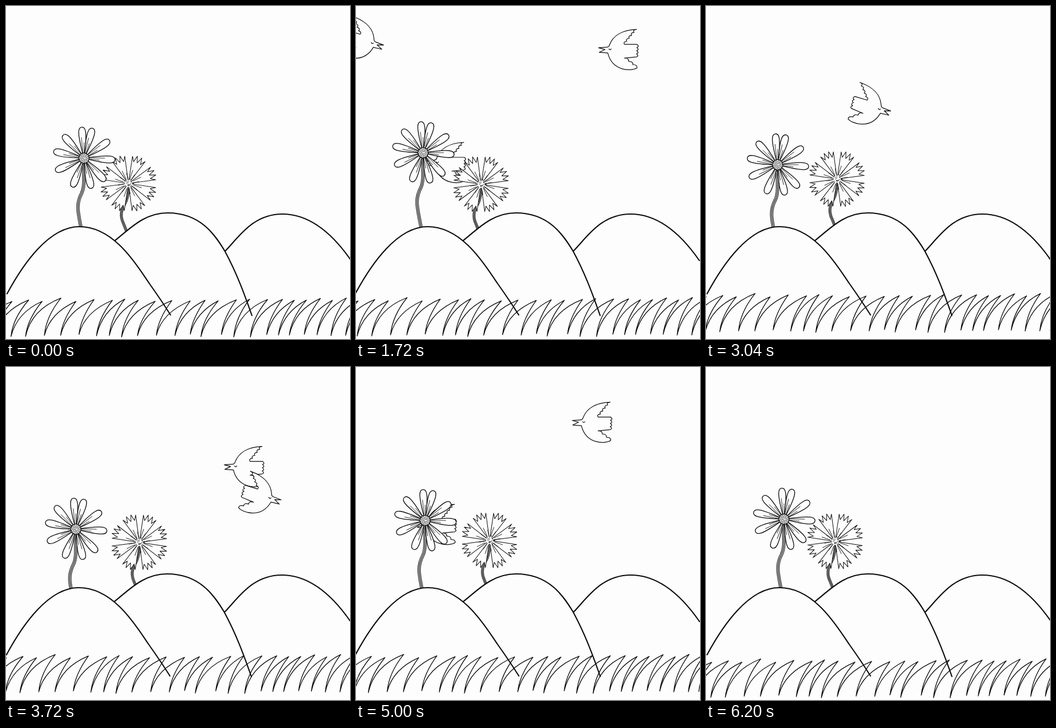
An HTML page with a canvas that plays this animation: 600x581 px, repeating every 6240 ms.

```html
<!DOCTYPE html>
<html lang="en">
<head>
<meta charset="utf-8">
<title>Flowers and birds</title>
<style>
html, body { margin: 0; width: 100%; height: 100%; overflow: hidden; background: #fefdfe; }
canvas { display: block; }
</style>
</head>
<body>
<canvas id="stage" width="600" height="581"></canvas>
<script>
const g = document.getElementById('stage').getContext('2d');
const INK = '#0c0c0c', PAPER = '#fefdfe', LOOP = 6240, STEP = 40;
const { sin, cos, PI } = Math, RAD = PI / 180;

function seeded(seed) {
  return () => (seed = seed * 16807 % 2147483647) / 2147483647;
}

// Sway: mean plus two harmonics of the loop
function sway(t, mean, c1, s1, c2, s2) {
  const a = 2 * PI * t / LOOP;
  return mean + c1 * cos(a) + s1 * sin(a) + c2 * cos(2 * a) + s2 * sin(2 * a);
}
const daisyAt = t => [sway(t, 124, 5.5, 0, 6.5, 0), sway(t, 268, -6.5, -8, 4, 4)];
const cornAt = t => [223.5 - 10.5 * cos(2 * PI * (t - 400) / 8000),
  309 - t / 1000 + 4 * cos(2 * PI * (t - 1860) / 2400)];
const grassAt = t => [sway(t, -5.5, 5, 4, 2, 3), sway(t, -4.5, 4, 4.5, 0, 2)];
const hillsAt = t => [sway(t, -1.7, 0, 0, 1.6, 0), 0];

// Flights give the place of the beak tip
const swoop = t => {
  const s = t - 1280;
  return [534 - .226 * s - 5.9e-5 * s * s, -28 + .32 * s - 1.853e-4 * s * s];
};
const glide = t => {
  const s = t - 1720;
  return [47 + .1914 * s + 1.226e-5 * s * s, 72 + .0974 * s - 7.8e-6 * s * s];
};
const lowKeys = [[100, 610, 50], [760, 325, 206], [1280, 273, 246], [1720, 122, 274],
  [2440, 85, 269], [3040, -80, 262]];

// Smooth curve through [time, x, y] keys, held at both ends
function along(keys, t) {
  const last = keys.length - 1;
  const time = Math.min(Math.max(t, keys[0][0]), keys[last][0]);
  const i = Math.max(keys.findIndex(k => k[0] >= time) - 1, 0);
  const a = keys[i], b = keys[i + 1], span = b[0] - a[0], u = (time - a[0]) / span;
  const slope = (k, d) => {
    const p = keys[Math.max(k - 1, 0)], q = keys[Math.min(k + 1, last)];
    return (q[d] - p[d]) / (q[0] - p[0]) * span;
  };
  return [1, 2].map(d =>
    (1 + 2 * u) * (1 - u) ** 2 * a[d] + u * (1 - u) ** 2 * slope(i, d) +
    u * u * (3 - 2 * u) * b[d] + u * u * (u - 1) * slope(i + 1, d));
}

function at([x, y], draw) {
  g.save();
  g.translate(x, y);
  draw();
  g.restore();
}

function shape(path, width, fill = PAPER) {
  if (fill) { g.fillStyle = fill; g.fill(path); }
  g.strokeStyle = INK;
  g.lineWidth = width;
  g.stroke(path);
}

// Row of rounded feather ends, bulging to the right of the direction of travel by depth
function feathers(path, [x1, y1], [x2, y2], count, depth) {
  const dx = (x2 - x1) / count, dy = (y2 - y1) / count, n = Math.hypot(dx, dy);
  path.lineTo(x1, y1);
  for (let i = 1; i <= count; i++) {
    const x = x1 + dx * i, y = y1 + dy * i;
    path.quadraticCurveTo(x - dx * .3 + dy / n * depth, y - dy * .3 - dx / n * depth, x, y);
  }
}

// Facing left, beak tip at the origin
const body = new Path2D('M0 -4 L14 -5 Q18 -5 19 -9 C25 -25 41 -35 66 -36');
feathers(body, [66, -36], [45, -10], 5, -5);
feathers(body, [67, -10], [66, 12], 4, 5);
feathers(body, [45, 14], [67, 31], 3, 5);
body.bezierCurveTo(58, 37, 24, 38, 16, 5);
body.lineTo(1, 4);
body.lineTo(11, -1);
body.closePath();
const eye = new Path2D('M18 -2 q2 3 4 0');

function bird(place, mirrored) {
  at(place, () => {
    if (mirrored) { g.rotate(17 * RAD); g.scale(-1, 1); }
    shape(body, 1.2);
    shape(eye, 1.2, null);
  });
}

const [midHill, farHill, nearHill] = [
  'M188 411 C215 390 240 361 282 361 C340 361 365 400 382 428 C402 465 415 500 429 540',
  'M382 428 C405 405 430 363 482 363 C535 363 575 405 602 444',
  'M2 502 C30 450 75 385 128 385 C190 385 230 455 250 484 Q272 515 287 539'
].map(d => new Path2D(d));

function stem(path, width) {
  [[width, INK], [width - 2.2, PAPER], [1.3, INK]].forEach(([w, color]) => {
    g.lineWidth = w;
    g.strokeStyle = color;
    g.stroke(path);
  });
}

function petal(degrees, path, veins, width) {
  g.save();
  g.rotate(degrees * RAD);
  shape(path, width);
  shape(veins, .8, null);
  g.restore();
}

const daisyStem = new Path2D('M0 10 C-2 25 3 46 -4 61 C-14 80 -11 92 -5 122 L-1 145');
const daisyPetal = new Path2D('M0 0 C-3 -15 -7 -34 -6 -46 C-5 -57 5 -57 6 -46 C7 -34 3 -15 0 0 Z');
const daisyVeins = new Path2D('M-1 -9 L-2 -36 M1 -9 L2 -27');
const daisyAngles = [318, 137, 283, 166, 246, 202, 93, 55, 16, -4];

function daisy() {
  stem(daisyStem, 5.6);
  daisyAngles.forEach(a => petal(a, daisyPetal, daisyVeins, 1.3));
  const disc = new Path2D();
  disc.arc(0, 0, 9, 0, 7);
  shape(disc, 1.3);
  g.fillStyle = INK;
  for (let i = 1; i < 36; i++) {
    const r = 1.4 * Math.sqrt(i), a = i * 2.4;
    g.fillRect(r * cos(a) - .7, r * sin(a) - .7, 1.4, 1.4);
  }
}

const cornStem = new Path2D('M0 10 Q-1 26 -6 35 Q-17 52 -9 69 L-3 84 L2 100');
const cornPetal = new Path2D('M0 0');
// Every second point of the rim is a notch
for (let i = -3; i <= 3; i++) {
  const a = i * 4.8 * RAD, r = i % 2 ? 51 - Math.abs(i) : 39;
  cornPetal.lineTo(r * sin(a), -r * cos(a));
}
cornPetal.closePath();
const cornVeins = new Path2D('M-1 -9 L-2 -24 M2 -8 L4 -18');

function cornflower() {
  stem(cornStem, 4.8);
  for (let i = 0; i < 8; i++) petal(23 + i * 45, cornPetal, cornVeins, 1);
  const rnd = seeded(77);
  g.fillStyle = PAPER;
  g.beginPath();
  g.arc(0, 0, 6, 0, 7);
  g.fill();
  g.fillStyle = INK;
  for (let i = 0; i < 16; i++) {
    const a = rnd() * 2 * PI, r = 2 + rnd() * 10, s = 1 + rnd();
    g.fillRect(r * cos(a), r * sin(a), s, s);
  }
}

// One zigzag line: up to each leaning tip, then down to its foot
const grass = new Path2D('M-46 575');
const rnd = seeded(4242);
for (let x = -18, foot = -46; x < 660; x += 18 + rnd() * 15) {
  const top = 510 + rnd() * 6, next = x - 25 - rnd() * 6;
  grass.quadraticCurveTo(foot + 10, top + 20, x, top);
  grass.quadraticCurveTo(next + 3, top + 32, next, 573 + rnd() * 5);
  foot = next;
}

function draw(now) {
  const t = Math.floor(now % LOOP / STEP) * STEP, half = t % (LOOP / 2);
  const hill = path => at(hillsAt(t), () => shape(path, 2.1));
  g.fillStyle = PAPER;
  g.fillRect(0, 0, 600, 581);
  g.lineJoin = g.lineCap = 'round';
  bird(swoop(half));
  bird(along(lowKeys, half));
  bird(glide(t), true);
  hill(farHill);
  at(cornAt(t), cornflower);
  hill(midHill);
  at(daisyAt(t), daisy);
  hill(nearHill);
  at(grassAt(t), () => shape(grass, 1.3, null));
}

const start = performance.now();
function tick() {
  draw(performance.now() - start);
  requestAnimationFrame(tick);
}
tick();
</script>
</body>
</html>
```
